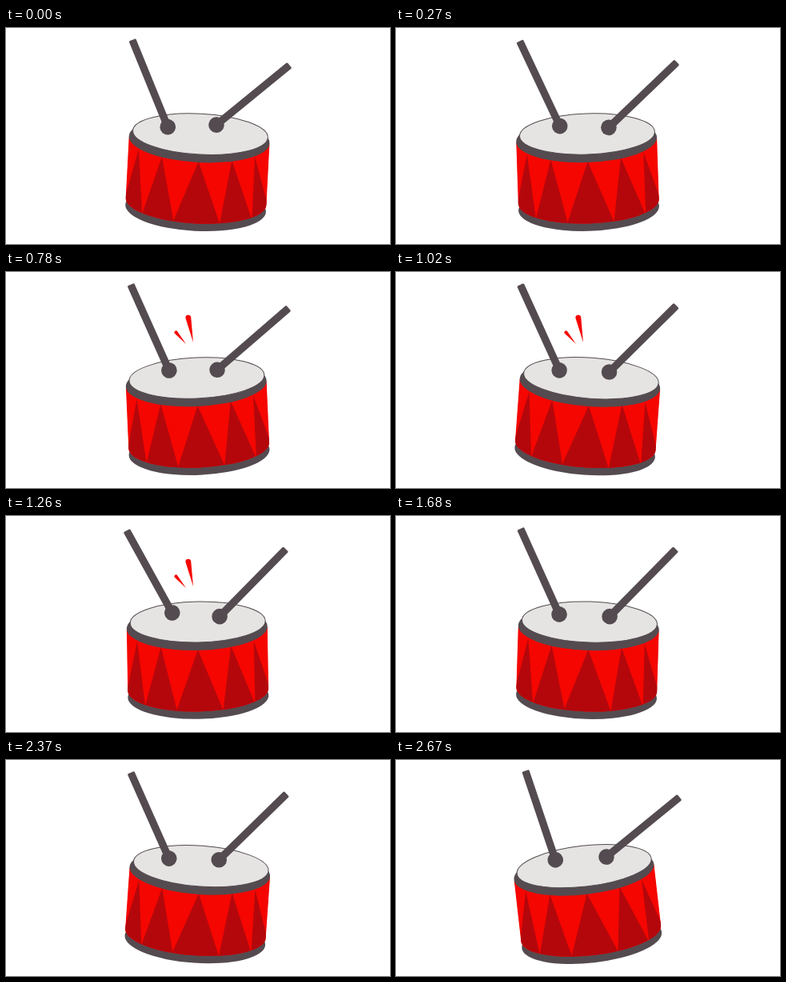
An HTML page that plays this animation: 480x270 px, repeating every 2700 ms.

```html
<!DOCTYPE html>
<html lang="en">
<head>
<meta charset="utf-8">
<title>Drum</title>
<style>
  html, body { margin: 0; width: 100%; height: 100%; overflow: hidden; background: #fff; }
  svg { display: block; width: 100vw; height: 100vh; }
  .dark { fill: #544b50; }
  .red { fill: #f50600; }
  .deep { fill: #b4070c; }
  .skin { fill: #e5e4e2; stroke: #544b50; }
</style>
</head>
<body>
<svg viewBox="0 0 480 270">
  <clipPath id="shell"><path d="M151.5 140V217A88 27.5 0 0 0 327.5 217V140Z"/></clipPath>
  <g id="drum">
    <ellipse class="dark" cx="239.5" cy="225.5" rx="88" ry="28.3"/>
    <g clip-path="url(#shell)">
      <path class="red" d="M150 130H330V260H150Z"/>
      <path class="deep" d="M151 215L164.5 155 173 236 194 163 212.5 242 240 167 270.5 243 281.5 163 310.5 236 310 157 328 213V260H151Z"/>
    </g>
    <ellipse class="dark" cx="239.5" cy="139.5" rx="88" ry="28.5"/>
    <ellipse class="skin" cx="240.5" cy="132.5" rx="84.5" ry="25.5"/>
  </g>
  <g class="red">
    <path id="markLeft" d="M225 90L210.8 76.8A2.1 2.1 0 0 1 214.2 74.2Z"/>
    <path id="markMiddle" d="M234 88L224.5 57.8A3.4 3.4 0 0 1 231.2 56.6Z"/>
    <path id="markRight" d="M242 95L246.8 63.8A3.3 3.3 0 0 1 253.2 65.4Z"/>
  </g>
  <g class="dark" id="left"><rect x="-4.7" y="-66" width="9.4" height="116" rx="1.5"/><circle cy="51.5" r="9.8"/></g>
  <g class="dark" id="right"><rect x="-4.7" y="-62.5" width="9.4" height="116" rx="1.5"/><circle cy="55.5" r="9.8"/></g>
</svg>
<script>
const STEP = 30, STEPS = 90, TURN = 2 * Math.PI;
const $ = id => document.getElementById(id);

// Every part makes one full swing between two beats and meets its key angle on the beat
const beats = [0, 18, 34, 42, 56, 68, 89];
const drum = { mid: 0, reach: 7.5, keys: [3, 0.7, 4.2, -1, 1.8, -2.5, -6.5] };
const left = { mid: 24, reach: 6, keys: [22.2, 23.3, 24.5, 29, 24.3, 28.8, 18.6] };
const right = { mid: 48.5, reach: 4, keys: [50.8, 50.8, 45.3, 44.5, 44.5, 50.8, 50.8] };

function angle({ mid, reach, keys }, step) {
  const next = Math.max(1, beats.findIndex(beat => beat >= step));
  const u = (step - beats[next - 1]) / (beats[next] - beats[next - 1]);
  const phase = i => Math.asin((keys[i] - mid) / reach);
  const from = phase(next - 1), to = phase(next) + TURN;
  return mid + reach * Math.sin(from + (to - from) * u);
}

const place = (id, transform) => $(id).setAttribute('transform', transform);
const show = (id, on) => $(id).style.display = on ? '' : 'none';

function draw() {
  const step = Math.floor(performance.now() / STEP) % STEPS;
  place('drum', `rotate(${angle(drum, step)} 239.5 179.5)`);
  place('left', `translate(182.8 76) rotate(${-angle(left, step)})`);
  place('right', `translate(306 86) rotate(${angle(right, step)})`);

  const ringing = step >= 12 && step < 46;
  show('markMiddle', ringing);
  show('markRight', ringing && step < 25);
  show('markLeft', ringing && step >= 25);
  requestAnimationFrame(draw);
}
draw();
</script>
</body>
</html>
```
